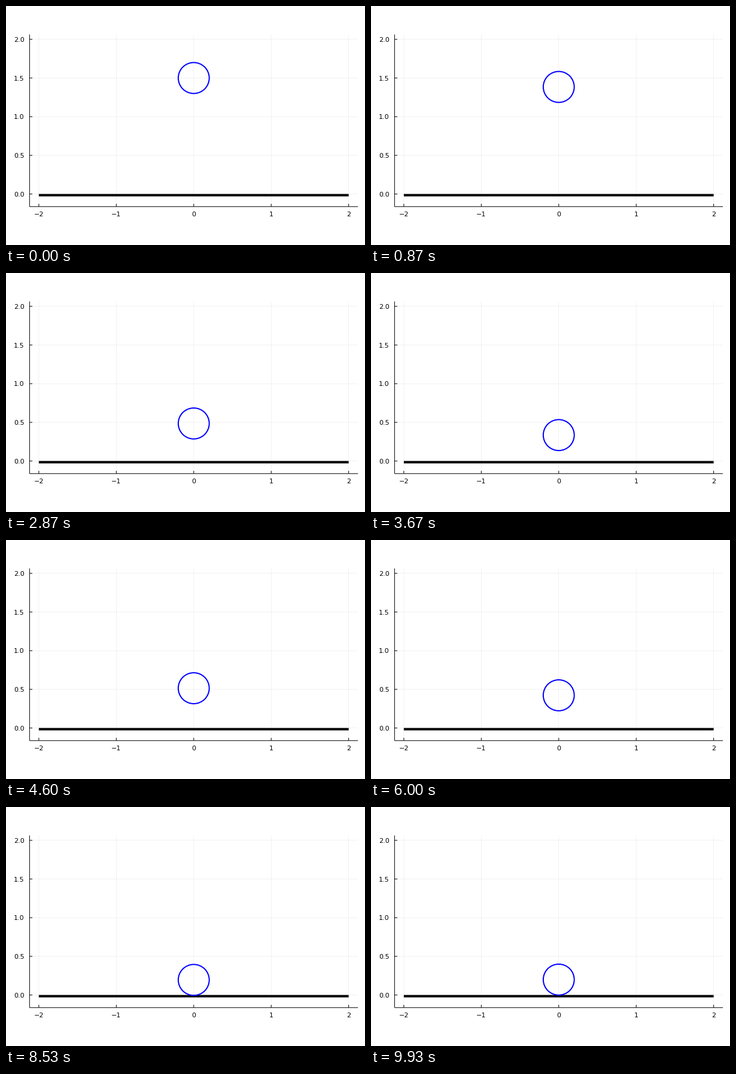
A matplotlib script that plays this animation: 600 px wide and 400 px high, repeating every 9990 ms.

```python
import matplotlib.pyplot as plt
from matplotlib.animation import FuncAnimation
from matplotlib.patches import Circle

W, H, DPI = 600, 400, 100
PT = 72 / DPI                     # points per pixel
SCALE = 129.44                    # pixels per unit
X0, Y0 = 313.78, 314.68           # pixel position of the origin
LEFT, RIGHT, TOP, BOTTOM = 39.37, 588.19, 47.64, 335.78
TICK = 4.7
FRAMES = 150

RADIUS = 0.2
GRAVITY, DT = 9.81, 0.01
BOUNCE = 0.5005


def px(x):
    return X0 + SCALE * x


def py(y):
    return Y0 - SCALE * y


def heights(count):
    """Heights of a dropped ball that loses speed at each bounce."""
    y, v = 1.5, -0.201
    path = [y]
    for _ in range(count - 1):
        if y <= RADIUS and v < 0:
            v *= -BOUNCE
        else:
            v -= GRAVITY * DT
        y += v * DT
        path.append(y)
    return path


plt.rcParams["font.family"] = "DejaVu Sans"
fig = plt.figure(figsize=(W / DPI, H / DPI), dpi=DPI, facecolor="white")
ax = fig.add_axes([0, 0, 1, 1])
ax.set_xlim(0, W)
ax.set_ylim(H, 0)
ax.axis("off")


def line(xs, ys, width, color="black", **kw):
    ax.plot(xs, ys, color=color, lw=width * PT, solid_capstyle="butt",
            snap=False, **kw)


def label(x, y, text, align):
    ax.text(x, y, text, fontsize=8, ha=align, va="baseline", color="black")


# Grid, ticks and tick labels
for x in range(-2, 3):
    line([px(x)] * 2, [TOP, BOTTOM], 0.5, alpha=0.1)
    line([px(x)] * 2, [BOTTOM, BOTTOM - TICK], 1)
    label(px(x), 351.6, str(x).replace("-", "\u2212"), "center")
for i in range(5):
    y = i / 2
    line([LEFT, RIGHT], [py(y)] * 2, 0.5, alpha=0.1)
    line([LEFT, LEFT + TICK], [py(y)] * 2, 1)
    label(30.9, py(y) + 4.1, f"{y:.1f}", "right")

# Axes
line([LEFT, RIGHT], [BOTTOM] * 2, 1)
line([LEFT] * 2, [TOP, BOTTOM], 1)

# Floor and ball
line([px(-2), px(2)], [py(-0.015)] * 2, 4, zorder=3)
path = heights(FRAMES)
ball = Circle((px(0), py(path[0])), RADIUS * SCALE, fill=False,
              edgecolor="blue", lw=2 * PT, zorder=4)
ax.add_patch(ball)


def draw(i):
    ball.center = px(0), py(path[i])
    return [ball]


anim = FuncAnimation(fig, draw, frames=FRAMES, interval=9990 / FRAMES,
                     repeat=True, repeat_delay=0)
plt.show()
```
